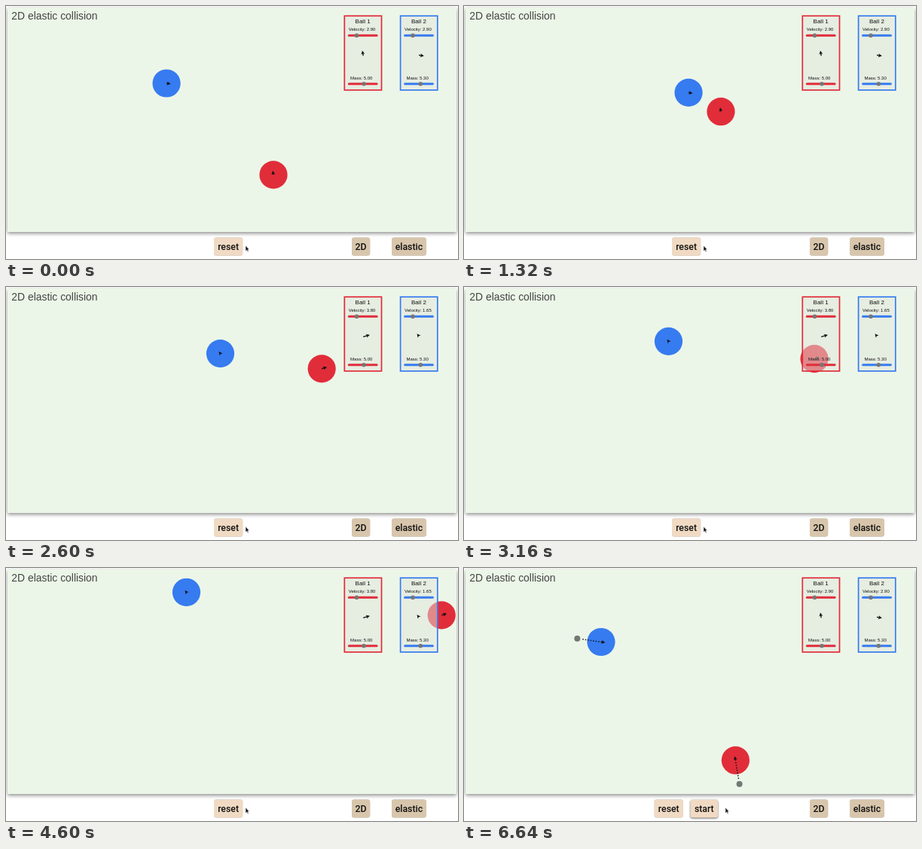
An HTML page that plays this animation: 600 by 337 pixels, repeating every 6.68 s.

```html
<!DOCTYPE html>
<html lang="en">
<head>
<meta charset="utf-8">
<title>2D elastic collision</title>
<style>
  html, body { margin: 0; width: 100%; height: 100%; overflow: hidden; background: #fff; }
  #stage { position: relative; width: 600px; height: 337px; overflow: hidden; }
  #field { position: absolute; left: 2px; top: 2px; width: 596px; height: 299px;
           background: #ecf6e8; box-shadow: 0 2px 5px rgba(0,0,0,.45); }
  svg { position: absolute; left: 0; top: 0; display: block; }
  text { font-family: "Liberation Sans", Arial, sans-serif; fill: #111; }
  .mid { text-anchor: middle; }
  .title { font-size: 13.9px; fill: #444; }
  .name { font-size: 8px; }
  .label { font-size: 6px; }
  .btn text { font: 500 12.3px Roboto, Arial, sans-serif; text-anchor: middle; fill: #111; }
  .btn rect { filter: drop-shadow(0 .6px .7px rgba(0,0,0,.35)); }
  .btn.hot rect { filter: drop-shadow(0 1px 1.2px rgba(0,0,0,.6)); }
</style>
</head>
<body>
<div id="stage">
  <div id="field"></div>
  <svg id="art" width="600" height="337" viewBox="0 0 600 337">
    <clipPath id="clip"><rect x="2" y="2" width="596" height="299"/></clipPath>
    <text class="title" x="7.3" y="18">2D elastic collision</text>
    <g id="balls" clip-path="url(#clip)"></g>
    <g id="panels"></g>
    <g id="buttons"></g>
    <path id="cursor" d="M0 0V7.2L1.7 5.7L2.9 8.1L4 7.6L2.9 5.3H5Z" fill="#111" stroke="#fff" stroke-width=".5"/>
  </svg>
</div>
<script>
const LOOP = 6680, HIT = 1460, RESET = 5840;
const RED = '#e12d3a', BLUE = '#367bf0';

// Loop time -> simulation time
const CLOCK = [[0, 0], [1380, 1380], [1720, 1550], [3720, 3550], [4040, 3850],
               [4080, 3850], [4600, 4370], [4760, 4530], [5440, 5350], [5840, 5830]];
const CURSOR_X = [[0, 318], [5500, 318], [5740, 304], [5900, 304], [6280, 347], [6680, 347]];

const BALLS = [
  { name: 'Ball 1', color: RED, home: [360.4, 256.2], from: [355, 225],
    v0: [-.0106, -.0638], v1: [.082, -.0237], speed: ['2.90', '3.80'],
    mass: '5.00', panel: 449, knobs: [16.5, 26], aim: [474.2, 66.3] },
  { name: 'Ball 2', color: BLUE, home: [182, 98.5], from: [213, 103],
    v0: [.0644, .0094], v1: [-.0232, -.029], speed: ['2.90', '1.65'],
    mass: '5.30', panel: 523.3, knobs: [16.7, 27], aim: [548, 65.4] }
];

const $ = id => document.getElementById(id);

function add(parent, tag, attrs, text) {
  const el = document.createElementNS('http://www.w3.org/2000/svg', tag);
  for (const key in attrs) el.setAttribute(key, attrs[key]);
  if (text) el.textContent = text;
  parent.appendChild(el);
  return el;
}

function lerpTable(table, t) {
  const i = table.findIndex(row => row[0] > t);
  if (i < 0) return table[table.length - 1][1];
  const [t0, a] = table[i - 1], [t1, b] = table[i];
  return a + (b - a) * (t - t0) / (t1 - t0);
}

function arrowPath(len) {
  const neck = len - 4;
  return `M${Math.min(0, neck)} -.65H${neck}L${neck - 1} -2.5L${len} 0L${neck - 1} 2.5L${neck} .65H${Math.min(0, neck)}Z`;
}

function point(el, [x, y], v, len) {
  const angle = Math.atan2(v[1], v[0]) * 180 / Math.PI;
  el.setAttribute('d', arrowPath(len));
  el.setAttribute('transform', `translate(${x} ${y}) rotate(${angle})`);
}

function makeBall(b) {
  b.g = add($('balls'), 'g', {});
  add(b.g, 'circle', { r: 18.6, fill: b.color });
  const speed = Math.hypot(...b.v0);
  const [hx, hy] = b.v0.map(c => -32 * c / speed);
  b.launcher = add(b.g, 'g', {});
  add(b.launcher, 'circle', { cx: hx, cy: hy, r: 4, fill: '#737873' });
  add(b.launcher, 'line', { x1: hx * .78, y1: hy * .78, x2: 0, y2: 0, stroke: '#111',
    'stroke-width': 1.5, 'stroke-dasharray': '1.5 2' });
  b.arrow = add(b.g, 'path', { fill: '#111' });
}

function makePanel(b) {
  const g = add($('panels'), 'g', { transform: `translate(${b.panel} 0)` });
  add(g, 'rect', { x: .3, y: 13.2, width: 49.2, height: 98.8, fill: 'rgba(226,230,220,.5)',
    stroke: b.color, 'stroke-width': 1.7 });
  add(g, 'text', { class: 'name mid', x: 24.6, y: 23 }, b.name);
  b.label = add(g, 'text', { class: 'label mid', x: 23.6, y: 33 });
  add(g, 'text', { class: 'label mid', x: 22.8, y: 97.6 }, 'Mass: ' + b.mass);
  [39.2, 103.7].forEach((y, i) => {
    add(g, 'rect', { x: 4.8, y: y - 1.5, width: 39.8, height: 3, rx: 1.5, fill: b.color });
    add(g, 'circle', { cx: b.knobs[i], cy: y, r: 2.8, fill: '#777' });
  });
  b.dial = add($('panels'), 'path', { fill: '#111' });
}

function makeButton(text, x, width, fill) {
  const g = add($('buttons'), 'g', { class: 'btn', transform: `translate(${x} 0)` });
  add(g, 'rect', { x: 0, y: 308.6, width, height: 24, rx: 3, fill });
  add(g, 'text', { x: width / 2, y: 325 }, text);
  return g;
}

BALLS.forEach(makeBall);
BALLS.forEach(makePanel);
const reset = makeButton('reset', 276, 38.2, '#f0dac3');
const start = makeButton('start', 300.5, 36.6, '#f0dac3');
start.classList.add('hot');
makeButton('2D', 459, 24.2, '#d8c6ac');
makeButton('elastic', 512, 45.8, '#d8c6ac');

function draw(t) {
  const ready = t >= RESET;
  const clock = lerpTable(CLOCK, t);
  const after = !ready && clock >= HIT;
  for (const b of BALLS) {
    const pos = ready ? b.home : b.from.map((p, i) =>
      p + b.v0[i] * Math.min(clock, HIT) + b.v1[i] * Math.max(0, clock - HIT));
    const v = after ? b.v1 : b.v0;
    const speed = b.speed[+after];
    b.g.setAttribute('transform', `translate(${pos[0]} ${pos[1]})`);
    b.launcher.style.display = ready ? '' : 'none';
    b.label.textContent = 'Velocity: ' + speed;
    point(b.arrow, [0, 0], v, speed * 1.9);
    point(b.dial, b.aim, v, speed * 2.4);
  }
  reset.setAttribute('transform', `translate(${ready ? 252.7 : 276} 0)`);
  start.style.display = ready ? '' : 'none';
  $('cursor').setAttribute('transform', `translate(${lerpTable(CURSOR_X, t)} 319.3)`);
}

const begin = performance.now();
function tick() {
  draw((performance.now() - begin) % LOOP);
  requestAnimationFrame(tick);
}
draw(0);
requestAnimationFrame(tick);
</script>
</body>
</html>
```
